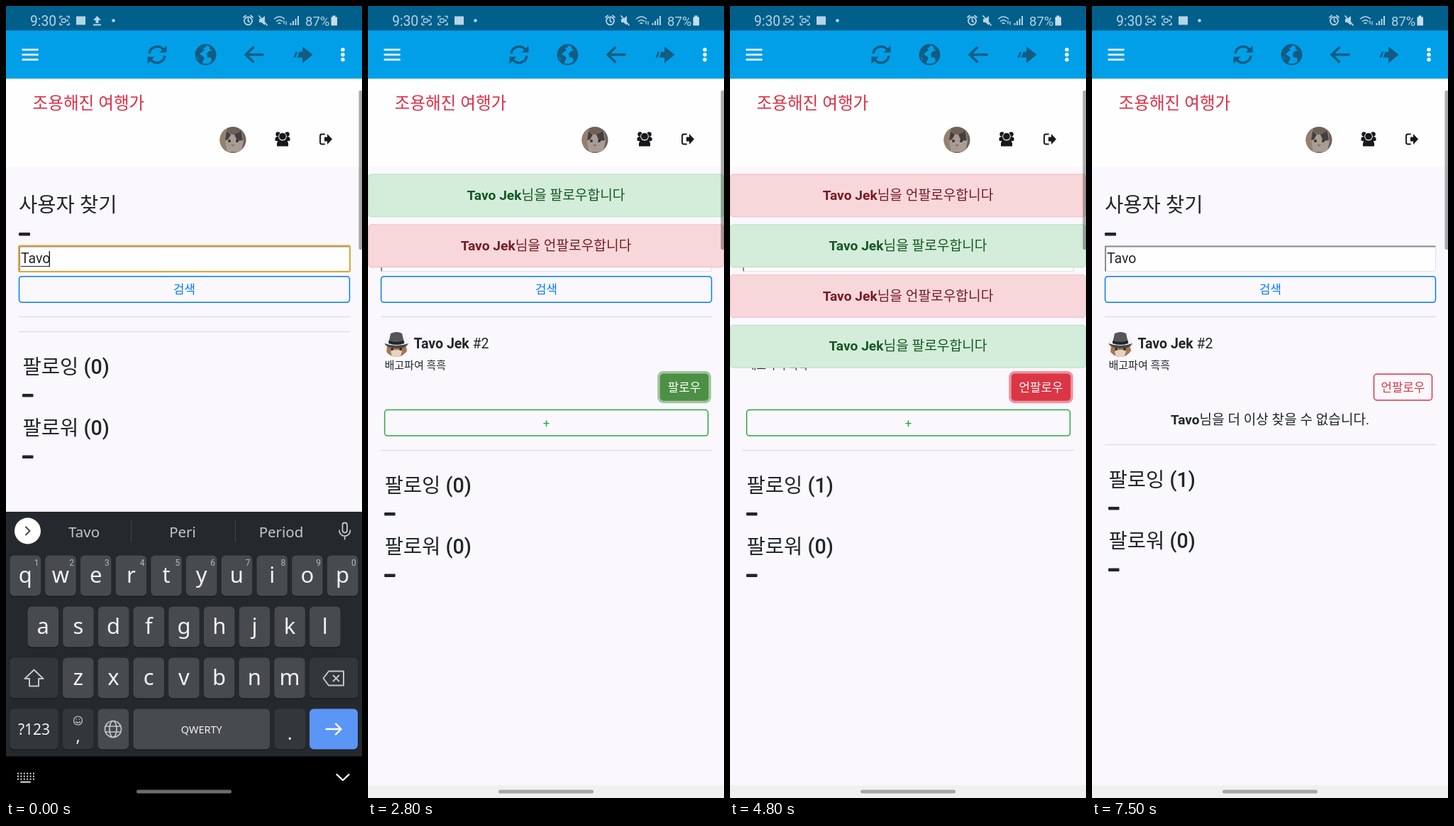
Write an HTML page that moves like this. It is 502 px wide and 1115 px high and loops after 8000 ms.

```html
<!DOCTYPE html>
<html lang="ko">
<head>
<meta charset="utf-8">
<title>사용자 찾기</title>
<style>
  html, body { margin: 0; width: 100%; height: 100%; overflow: hidden; background: #faf8fc; }
  svg { display: block; width: 502px; height: 1115px; }
  text { font-family: Roboto, "Noto Sans CJK KR", "Noto Sans KR", sans-serif; font-size: 19.5px; fill: #212529; }
  .mid { text-anchor: middle; }
  .b { font-weight: 700; }
  .h { font-size: 28.6px; font-weight: 500; }
  .btn text { font-size: 16.8px; text-anchor: middle; }
  .toast { font-size: 19.2px; font-weight: 500; text-anchor: middle; }
  .key text, .sug { font-family: "Noto Sans", sans-serif; text-anchor: middle; fill: #f1f2f3; }
  .line { fill: none; stroke-linecap: round; stroke-linejoin: round; }
  .status text { font-size: 18.5px; fill: #b5d4e4; }
</style>
</head>
<body>
<svg viewBox="0 0 502 1115">
  <defs>
    <clipPath id="face"><circle cx="320" cy="188.500" r="18.500"/></clipPath>
    <clipPath id="pic"><circle cx="40" cy="476.500" r="17.500"/></clipPath>
    <clipPath id="world"><circle cx="281.500" cy="68.500" r="14"/></clipPath>
  </defs>
  <rect width="502" height="1115" fill="#faf8fc"/>
  <rect y="102" width="502" height="124.500" fill="#fffeff"/>

  <!-- status bar -->
  <g class="status">
    <rect width="502" height="35" fill="#005f8b"/>
    <text x="34" y="27.500" style="font-size:19.300px">9:30</text>
    <g id="camA"></g>
    <g id="camB"></g>
    <rect id="mail" x="-6.500" y="14.500" width="13" height="12" fill="#b5d4e4"/>
    <path id="up" d="M128.500 14l5.500 6h-3.500v4h-4v-4h-3.500zM123 25.500h11v2h-11z" fill="#b5d4e4"/>
    <circle cx="151.500" cy="20.500" r="2.300" fill="#b5d4e4"/>
    <g class="line" stroke="#b5d4e4" stroke-width="1.800">
      <circle cx="341.500" cy="21" r="5.500"/>
      <path d="M341.500 18v3.500l2 1M335 16l3-2.500M348 16l-3-2.500"/>
      <path d="M357 14l11 13"/>
      <path d="M378.500 18q7-6 14 0M381.500 21.500q4-3.500 8 0M384 24.500q1.500-1.300 3 0" stroke-width="1.600"/>
      <path d="M392 25v-4M395 22v4" stroke-width="1.300"/>
    </g>
    <path d="M357 18h3l5-4v13l-5-4h-3z" fill="#b5d4e4"/>
    <path d="M400.500 24h2v3h-2zM404 21h2v6h-2zM407.500 18h2v9h-2zM411 14h2v13h-2z" fill="#b5d4e4"/>
    <text x="422" y="27.500">87%</text>
    <path d="M458.500 15.500h2v-2h4v2h2.500v12h-8.500z" fill="#c6dfec"/>
  </g>

  <!-- toolbar -->
  <rect y="34.500" width="502" height="68" fill="#029fe9"/>
  <rect y="102.500" width="502" height="1" fill="#dbe9f2"/>
  <path d="M22.500 61.500h23M22.500 68.500h23M22.500 75.500h23" stroke="#fff" stroke-width="2.500"/>
  <g fill="#fff"><circle cx="475" cy="61.500" r="2.700"/><circle cx="475" cy="68.500" r="2.700"/><circle cx="475" cy="75.500" r="2.700"/></g>
  <g fill="none" stroke="#125c82" stroke-width="3.400">
    <path d="M202 67a11.200 11.200 0 0 1 19.500-6M224 70a11.200 11.200 0 0 1-19.500 6"/>
    <path d="M338.500 68.500h25M349.500 57.500l-11.500 11 11.500 11"/>
    <circle cx="281.500" cy="68.500" r="13.800" stroke-width="2.200"/>
  </g>
  <g fill="#125c82">
    <path d="M226.500 55.500v10h-10zM199.500 81.500v-10h10z"/>
    <path clip-path="url(#world)" d="M267 66l5-9 9-3 1 4-4 1 2 3-4 3-3 3 4 2 3 3-2 4-2 5-4-3-1-6-3-3zM287 56l8 3 3 10-4 9-4 2-1-7-5-1-1-5 4-4 4 0-4-3z"/>
    <path d="M418 57l14.500 11.500L418 80.500v-8h-5.500l3.500-8h2zM405.500 72.500l3-8h2.800l-3 8zM410.500 72.500l3-8h2.300l-3 8z"/>
  </g>

  <!-- site header -->
  <text x="37.500" y="145" style="font-size:23.600px;font-weight:500;fill:#dc2f45">조용해진 여행가</text>
  <g clip-path="url(#face)">
    <rect x="300" y="168" width="40" height="42" fill="#6f6158"/>
    <path d="M300 168h12l-2 42h-10z" fill="#94806f"/>
    <path d="M309 188l2-12 7 5h7l8-5 2 14-3 14-10 6-11-6z" fill="#a89c95"/>
    <path d="M311 176l6 5-4 7-4 1zM322 181l10-5 2 13-8 1z" fill="#45403f"/>
    <circle cx="315" cy="190" r="2" fill="#37332f"/><circle cx="326" cy="190" r="2" fill="#37332f"/>
    <path d="M317 195h6l-3 3z" fill="#94706a"/>
    <path d="M306 210q14-10 29 0z" fill="#82756d"/>
  </g>
  <g fill="#16181b">
    <circle cx="383.500" cy="180.500" r="3.200"/><circle cx="396.500" cy="180.500" r="3.200"/>
    <path d="M379.500 189v-3q1-2.500 5-2l2 6h-6zM400.500 189v-3q-1-2.500-5-2l-2 6h6z"/>
    <circle cx="390" cy="183.500" r="5.300" stroke="#fff" stroke-width="1"/>
    <path d="M382 197.500v-4q1-5 4.500-5 3.500 2 7 0 3.500 0 4.500 5v4z"/>
    <path d="M449 184.500h4v-4.500l7 7.500-7 7.500v-4.500h-4z"/>
  </g>
  <path class="line" d="M449 180.500h-3.500q-2.500 0-2.500 2.500v9q0 2.500 2.500 2.500h3.500" stroke="#16181b" stroke-width="1.900"/>

  <!-- search -->
  <text class="h" x="18" y="290">사용자 찾기</text>
  <rect x="18" y="319" width="16" height="4.500" rx="1" fill="#212529"/>
  <rect x="18.500" y="338" width="466" height="35.500" rx="2" fill="#fffeff" stroke="#e6e5e9" stroke-width="1.500"/>
  <path d="M19 373.500v-35h465.500" fill="none" stroke="#8b8a8e" stroke-width="2"/>
  <rect id="focus" x="18" y="337.500" width="467" height="36.500" rx="2" fill="none" stroke="#dda63a" stroke-width="2"/>
  <text x="21" y="362" fill="#111">Tavo</text>
  <path id="under" d="M21 366.500h40" stroke="#222" stroke-width="1.200"/>
  <path id="caret" d="M61.300 345v22" stroke="#111" stroke-width="1.300"/>
  <g id="find"></g>
  <path d="M18 437.500h467" stroke="#dfdee2" stroke-width="1.300"/>

  <!-- result -->
  <g id="result">
    <g clip-path="url(#pic)">
      <rect x="22" y="458" width="36" height="37" fill="#f4f2f3"/>
      <path d="M27 478h26l3 10-5 8h-22l-3-8z" fill="#a5754f"/>
      <path d="M32 486q8-4 16 0l-3 9h-11z" fill="#e3d3c3"/>
    </g>
    <path d="M29 474l3-13q9-4 16 0l3 13q-11 4-22 0z" fill="#55565a"/>
    <path d="M29.500 471q10 4 21 0l.8 4q-11 4-22.500 0z" fill="#232427"/>
    <path d="M23 475q17 6 34 0-4 8-17 7-13 0-17-7z" fill="#47484c"/>
    <circle cx="34" cy="483" r="1.700" fill="#222"/><circle cx="46" cy="483" r="1.700" fill="#222"/>
    <text x="64.500" y="481.500"><tspan class="b">Tavo Jek</tspan> #2</text>
    <text x="23.500" y="510.500" style="font-size:15px">배고파여 흑흑</text>
    <g id="follow"></g>
    <g id="more"></g>
    <text id="none" class="mid" x="251" y="588.500" style="font-size:19.100px"><tspan class="b">Tavo</tspan>님을 더 이상 찾을 수 없습니다.</text>
  </g>

  <!-- lists -->
  <g id="lists">
    <path d="M18 458.500h467" stroke="#dfdee2" stroke-width="1.300"/>
    <text class="h" x="23.500" y="517.500">팔로잉 <tspan id="count">(0)</tspan></text>
    <rect x="23" y="546" width="15.500" height="4.500" rx="1" fill="#212529"/>
    <text class="h" x="23.500" y="604">팔로워 (0)</text>
    <rect x="23" y="632.500" width="15.500" height="4.500" rx="1" fill="#212529"/>
  </g>

  <g id="toasts"></g>
  <rect x="497.500" y="119" width="6" height="224" rx="2" fill="#000" opacity=".33"/>
  <rect y="1097" width="502" height="18" fill="#f1f0f1"/>
  <g id="board"></g>
  <rect id="pill" x="184" y="1103.500" width="134" height="5" rx="2.500" fill="#a6a6a6"/>
</svg>
<script>
const $ = id => document.getElementById(id);
const LOOP = 8000, GREEN = [40, 167, 69], RED = [220, 53, 69], BLUE = [0, 123, 255], WHITE = [255, 255, 255];
const clamp = x => Math.max(0, Math.min(1, x));
const ramp = (t, from, to) => clamp((t - from) / (to - from));
const ease = x => x * x * (3 - 2 * x);
const mix = (a, b, k) => a.map((v, i) => Math.round(v + (b[i] - v) * k));
const rgba = (c, a = 1) => `rgba(${c},${a})`;
const show = (id, on) => $(id).style.display = on ? '' : 'none';
const move = (el, x, y) => el.setAttribute('transform', `translate(${x} ${y})`);

// Screen-recorder icons
for (const id of ['camA', 'camB']) {
  $(id).innerHTML = `<path class="line" stroke="#b5d4e4" stroke-width="1.500"
    d="M-6.500 17v-2.500h3M3.500 14.500h3v2.500M6.500 24v2.500h-3M-3.500 26.500h-3v-2.500"/>
    <g class="cam"><rect x="-4" y="18" width="5.500" height="5" rx="1" fill="none" stroke="#b5d4e4" stroke-width="1.300"/>
    <path d="M2 20.500l3-2v4z" fill="#b5d4e4"/></g>`;
}

// Outline buttons: fill 0 is the resting look, 1 is pressed or focused
function makeButton(id, y, label) {
  const g = $(id);
  g.setAttribute('class', 'btn');
  g.innerHTML = `<rect y="${y - 2.2}" height="41" rx="6" fill="none" stroke-width="4.200"/>
    <rect y="${y}" height="36.600" rx="4" stroke-width="1.500"/><text y="${y + 24.2}">${label}</text>`;
  const [ring, box, text] = g.children;
  return (x, right, color, fill, glow = fill) => {
    box.setAttribute('x', x);
    box.setAttribute('width', right - x);
    ring.setAttribute('x', x - 2.2);
    ring.setAttribute('width', right - x + 4.4);
    text.setAttribute('x', (x + right) / 2);
    box.style.stroke = rgba(color);
    box.style.fill = rgba(color, fill);
    ring.style.stroke = rgba(color, .5 * glow);
    text.style.fill = rgba(mix(color, WHITE, fill));
    return text;
  };
}
const find = makeButton('find', 380.7, '검색');
const follow = makeButton('follow', 518.3, '팔로우');
const more = makeButton('more', 568.5, '+');

// Each toast: [shown, gone]; they alternate follow and unfollow
const TOASTS = [[2105, 4600], [2705, 5300], [3005, 5700], [3305, 6200], [4305, 7000]];
const toasts = TOASTS.map((_, i) => {
  const [bg, edge, ink, word] = i % 2 ? ['#f8d7da', '#f3c3c9', '#721c24', '언팔로우'] : ['#d4edda', '#bfe3c8', '#155724', '팔로우'];
  const g = document.createElementNS('http://www.w3.org/2000/svg', 'g');
  g.innerHTML = `<rect x=".5" y="237" width="501" height="59.700" rx="4.500" fill="${bg}" stroke="${edge}" stroke-width="1.300"/>
    <text class="toast" x="251" y="273" style="fill:${ink}"><tspan class="b">Tavo Jek</tspan>님을 ${word}합니다</text>`;
  return $('toasts').appendChild(g);
});

function buildBoard() {
  const STEP = 49.7, LIGHT = '#474a4f', DARK = '#33373c';
  const key = (x, y, w, label = '', fill = LIGHT, size = 31, dy = 38) =>
    `<g class="key"><rect x="${x}" y="${y + 1.5}" width="${w}" height="57" rx="6" fill="#191c1f"/>
    <rect x="${x}" y="${y}" width="${w}" height="57" rx="6" fill="${fill}"/>
    <text x="${x + w / 2}" y="${y + dy}" style="font-size:${size}px">${label}</text></g>`;
  const row = (letters, x, y) => [...letters].map((c, i) => key(x + i * STEP, y, 43.5, c)).join('');
  const line = (d, w = 2, c = '#c3c6c9') => `<path class="line" d="${d}" stroke="${c}" stroke-width="${w}"/>`;
  const sug = (x, s) => `<text class="sug" x="${x}" y="747.500" style="font-size:20.500px;fill:#c3c6c9">${s}</text>`;
  const digits = [...'1234567890'].map((d, i) =>
    `<text x="${43 + i * STEP}" y="787.500" class="mid" style="font-size:12px;fill:#b4b7ba">${d}</text>`).join('');
  $('board').innerHTML = `<rect y="712" width="502" height="345" fill="#25292e"/>
    <rect y="1056.500" width="502" height="59" fill="#000"/>
    <circle cx="30.500" cy="739" r="18.500" fill="#fff"/>${line('M28 733.500l5.500 5.500-5.500 5.500', 2, '#44484c')}
    ${sug(110, 'Tavo')}${sug(249, 'Peri')}${sug(388, 'Period')}
    ${line('M176.500 724v30M323.500 724v30', 1, '#3f4348')}
    <rect x="474.500" y="727.500" width="6.500" height="14" rx="3.200" fill="none" stroke="#c3c6c9" stroke-width="1.800"/>
    ${line('M470 738.500a7.700 7.700 0 0 0 15.400 0M477.700 746.500v4', 1.800)}
    ${row('qwertyuiop', 5.5, 773.5)}${digits}${row('asdfghjkl', 30.5, 845.5)}${row('zxcvbnm', 80, 917.5)}
    ${key(5.5, 917.5, 68, '', DARK)}${key(428, 917.5, 68, '', DARK)}
    ${line('M39.500 934.500l-13 12.500h6.500v10.500h13v-10.500h6.500z')}
    ${line('M455 936.500h21v20h-21l-7.500-10zM461.500 942.500l8 8M469.500 942.500l-8 8')}
    ${key(5.5, 989.5, 68, '?123', DARK, 21, 36)}${key(80, 989.5, 43.5, ',', DARK, 24, 46)}
    ${key(129.5, 989.5, 43.5)}${key(179.5, 989.5, 192.5, 'QWERTY', LIGHT, 14.5, 34)}
    ${key(378.5, 989.5, 43.5, '.', DARK, 26, 43)}${key(428, 989.5, 68, '', '#5b95f5')}
    <circle cx="101.500" cy="1006" r="6" fill="none" stroke="#c3c6c9" stroke-width="1.200"/>
    ${line('M98.500 1007.500q3 3 6 0M99.500 1004v.3M103.500 1004v.3', 1.300)}
    <circle cx="151" cy="1018" r="11.500" fill="none" stroke="#c3c6c9" stroke-width="1.700"/>
    <ellipse cx="151" cy="1018" rx="5" ry="11.500" fill="none" stroke="#c3c6c9" stroke-width="1.700"/>
    ${line('M140.500 1014h21M140.500 1022h21', 1.700)}
    ${line('M451.500 1018h21M465 1010.500l7.500 7.500-7.500 7.500', 2.300, '#fff')}
    <path d="M16 1080.500h24M16 1084.500h24M16 1088.500h24" stroke="#e4e4e4" stroke-width="2" stroke-dasharray="2 2.400"/>
    ${line('M21 1092.500h13', 2, '#e4e4e4')}${line('M466.500 1082l8.500 8 8.500-8', 2.400, '#fff')}`;
}
buildBoard();

function draw(t) {
  // status icons
  const p = ease(ramp(t, 100, 400));
  move($('camA'), 82.5, 0);
  $('camA').style.opacity = p;
  move($('camB'), 82.5 + 23 * p, 0);
  move($('mail'), 105.5 + 23 * p, 0);
  $('up').style.opacity = 1 - p;
  const blink = t % 2000 >= 1000 && t % 2000 < 1500;
  $('camA').querySelector('.cam').style.opacity = blink ? 0 : 1;

  // input and keyboard
  show('focus', t < 900);
  show('under', t < 900);
  show('caret', t < 600);
  const hide = ramp(t, 950, 1250);
  move($('board'), 0, 403 * hide * hide);
  $('pill').style.fill = hide < 1 ? '#6c6c6c' : '#a6a6a6';
  find(18.5, 484.5, BLUE, ramp(t, 880, 1030) - ramp(t, 1880, 2000));

  // result and follow state
  show('result', t >= 1300);
  const flips = TOASTS.filter(([on]) => t >= on);
  const n = flips.length, on = n % 2;
  const since = n ? ramp(t, flips[n - 1][0], flips[n - 1][0] + 120) : 1;
  const color = on ? mix(GREEN, RED, since) : n ? mix(RED, GREEN, since) : GREEN;
  follow(on ? 397.5 : 412.5, 479.5, color, ramp(t, 1880, 2000) - ramp(t, 6380, 6530))
    .textContent = on ? '언팔로우' : '팔로우';
  $('count').textContent = `(${on})`;

  show('more', t < 5400);
  more(23.5, 479.5, GREEN, ramp(t, 5080, 5200), 0);
  show('none', t >= 5600);
  move($('lists'), 0, t < 1300 ? 0 : t < 5400 ? 167 : t < 5600 ? 117 : 159);

  // toast stack
  let slot = 0;
  toasts.forEach((g, i) => {
    const [from, to] = TOASTS[i], live = t >= from && t < to;
    g.style.display = live ? '' : 'none';
    if (!live) return;
    g.style.opacity = 1 - ramp(t, to - 200, to);
    move(g, 0, 70.8 * slot++);
  });
}

const start = performance.now();
function tick() {
  draw((performance.now() - start) % LOOP);
  requestAnimationFrame(tick);
}
draw(0);
requestAnimationFrame(tick);
</script>
</body>
</html>
```
